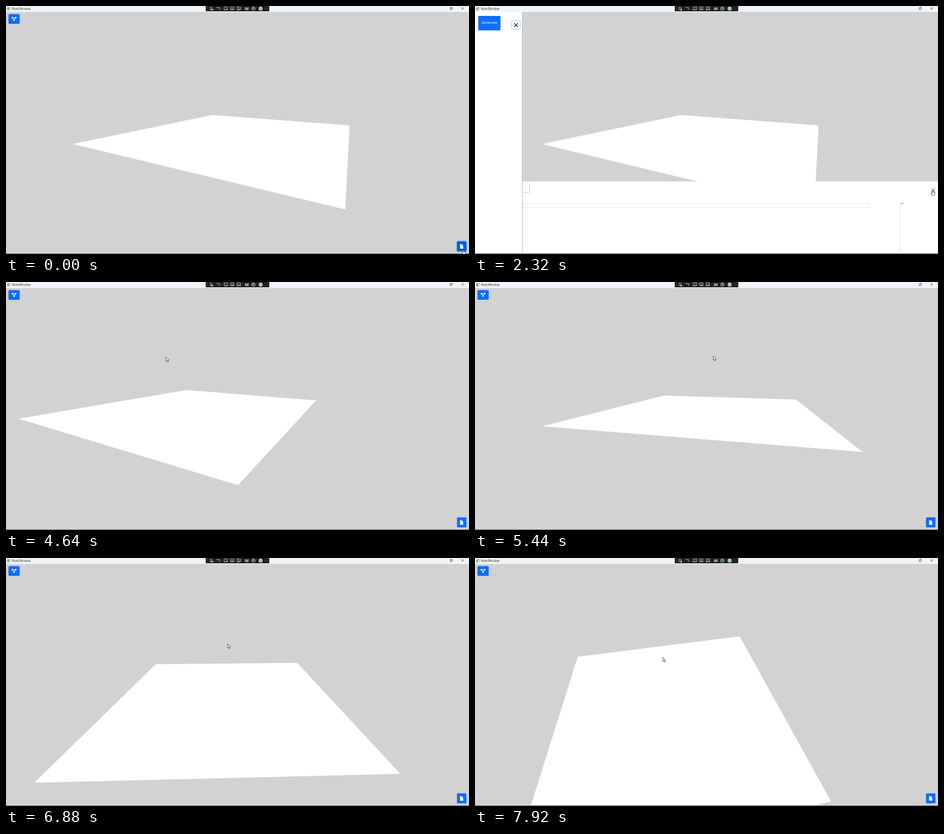
An HTML page with a canvas for the animation above (8 s loop, 700 by 376 pixels).

```html
<!DOCTYPE html>
<html lang="en">
<head>
<meta charset="utf-8">
<title>MainWindow</title>
<style>
  html, body { margin: 0; width: 100%; height: 100%; overflow: hidden; background: #d2d2d2; }
  canvas { display: block; width: 700px; height: 376px; }
</style>
</head>
<body>
<canvas id="stage"></canvas>
<script>
const W = 700, H = 376, BAR = 9, LOOP = 8000, STEP = 80;
const BLUE = '#0d6efd', HOVER = '#0b5ed7', RING = '#9ec1f5', INK = '#d5d5d5';
const RAD = Math.PI / 180;
const FOCAL = (H - BAR) / 2 / Math.tan(30 * RAD);
const canvas = document.getElementById('stage');
const g = canvas.getContext('2d');
const ratio = window.devicePixelRatio || 1;
canvas.width = W * ratio;
canvas.height = H * ratio;

// time; camera yaw and pitch in degrees; centre of the unit square in camera space
const views = [
  [3760, 27.9, 12.65, 0, 0, 1.065],
  [4160, 27.9, 12.65, 0.115, 0.035, 1.065],
  [4640, 27.9, 12.65, -0.207, -0.006, 1.05],
  [6080, 3.1, 8.18, 0.197, 0.001, 1.157],
  [7280, -4.1, 32.1, -0.186, 0.077, 0.969],
  [7920, -12, 47.35, -0.167, 0.116, 0.98]
];

// time, then the tip of the pointer
const pointer = [
  [320, 691.5, 370], [960, 383, 304], [1520, 9, 23.5], [1920, 9, 23.5],
  [2320, 692, 279], [2800, 692, 279], [3200, 63, 29], [3280, 63, 29],
  [3440, 243.5, 70], [3760, 304, 117], [4640, 242, 114],
  [6080, 455, 111], [7280, 275.5, 140], [7920, 284, 150.5]
];

function track(keys, t) {
  const next = keys.findIndex(key => key[0] >= t);
  if (next <= 0) return keys.at(next).slice(1);
  const a = keys[next - 1], b = keys[next];
  const k = (t - a[0]) / (b[0] - a[0]);
  return a.slice(1).map((v, i) => v + (b[i + 1] - v) * k);
}

function ease(t, start, length) {
  const k = Math.min(1, Math.max(0, (t - start) / length));
  return k * k * (3 - 2 * k);
}

function rect(x, y, w, h, color) {
  g.fillStyle = color;
  g.fillRect(x, y, w, h);
}

function round(x, y, w, h, r, color) {
  g.fillStyle = color;
  g.beginPath();
  g.roundRect(x, y, w, h, r);
  g.fill();
}

function path(points, close) {
  g.beginPath();
  for (let i = 0; i < points.length; i += 2) g.lineTo(points[i], points[i + 1]);
  if (close) g.closePath();
}

function line(points, color, width, close) {
  path(points, close);
  g.strokeStyle = color;
  g.lineWidth = width;
  g.stroke();
}

function shape(points, color) {
  path(points, true);
  g.fillStyle = color;
  g.fill();
}

function dot(x, y, r, color) {
  g.fillStyle = color;
  g.beginPath();
  g.arc(x, y, r, 0, Math.PI * 2);
  g.fill();
}

function box(x, y, w, h, color, width) {
  g.strokeStyle = color;
  g.lineWidth = width;
  g.strokeRect(x, y, w, h);
}

function cross(x, y, r, color, width) {
  line([x - r, y - r, x + r, y + r], color, width);
  line([x + r, y - r, x - r, y + r], color, width);
}

function label(text, x, y, size, color, align = 'left') {
  g.font = size + 'px "Open Sans", sans-serif';
  g.textAlign = align;
  g.textBaseline = 'middle';
  g.fillStyle = color;
  g.fillText(text, x, y);
}

function button(x, y, w, h, hover, focus) {
  if (focus) round(x - 1.5, y - 1.5, w + 3, h + 3, 2.5, RING);
  round(x, y, w, h, 1.5, hover ? HOVER : BLUE);
}

function ground(t) {
  const [yaw, pitch, x, y, z] = track(views, t);
  const s = Math.sin(yaw * RAD) / 2, c = Math.cos(yaw * RAD) / 2;
  const corners = [[-1, -1], [1, -1], [1, 1], [-1, 1]];
  shape(corners.flatMap(([a, b]) => {
    const side = a * s + b * c, away = a * c - b * s;
    const zoom = FOCAL / (z + away * Math.cos(pitch * RAD));
    return [
      W / 2 + (x + side) * zoom,
      (H + BAR) / 2 + (y - away * Math.sin(pitch * RAD)) * zoom
    ];
  }), '#fff');
}

function titleBar() {
  rect(0, 0, W, BAR, '#eff4f9');
  rect(2, 2, 4.5, 4.5, '#8a9a9f');
  rect(2.6, 3.2, 1.6, 2.7, '#4d9a80');
  rect(4.5, 3.2, 1.5, 2.7, '#f4f8fa');
  label('MainWindow', 9, 4.6, 4.6, '#333');
  box(671.5, 2.8, 2.6, 2.6, '#444', 0.6);
  line([672.5, 2, 675, 2, 675, 4.5], '#444', 0.5);
  cross(690.3, 3.8, 1.7, '#333', 0.6);
  debugBar();
}

function debugBar() {
  rect(302, 0, 96, 8, '#202020');
  for (let y = 2; y < 7; y += 2) rect(304, y, 0.8, 0.8, '#777');
  box(308.5, 2, 3, 3.5, INK, 0.6);
  dot(311.7, 5.5, 1.3, INK);
  line([318, 2.5, 323, 2.5, 323, 5.8], INK, 0.7);
  for (let i = 0; i < 3; i++) {
    box(330 + i * 9.7, 1.7, 5, 4, INK, 0.7);
    rect(361.5 + i * 1.9, 2 + i % 2 * 0.5, 1.2, 4, INK);
  }
  line([331.5, 6.5, 333.5, 4.2], INK, 0.8);
  rect(341, 4, 2, 1, INK);
  line([350.5, 6.5, 353.5, 3.5], INK, 1);
  dot(374, 4, 2.8, INK);
  dot(374, 4, 2.1, '#202020');
  dot(374, 3.6, 1, INK);
  dot(385, 4, 3, '#b9dfb9');
  line([383.5, 4, 384.6, 5.2, 386.6, 2.8], '#237a32', 0.8);
  line([393, 3.5, 394, 4.5, 395, 3.5], '#555', 0.5);
}

function nodesButton(hover, focus) {
  button(3.7, 12.3, 17, 14.8, hover, focus);
  const nodes = [9.7, 17.8, 14.5, 17.8, 12.2, 21.3];
  line(nodes, '#fff', 0.8, true);
  for (let i = 0; i < 6; i += 2) rect(nodes[i] - 1.1, nodes[i + 1] - 1.1, 2.2, 2.2, '#fff');
}

function fileButton(hover, focus) {
  button(681.8, 356.8, 14.4, 15.3, hover, focus);
  shape([686.6, 361, 689.4, 361, 691.2, 363, 691.2, 368, 686.6, 368], '#fff');
  line([689.4, 361, 689.4, 363, 691.2, 363], BLUE, 0.5);
}

function scriptPanel(open) {
  if (!open) return;
  g.save();
  g.translate(0, 110 * (1 - open));
  rect(0, 266, W, 110, '#fff');
  box(2.5, 269, 80, 13.5, '#eee', 0.6);
  line([3, 282.6, 82.5, 282.6, 82.5, 269.5], '#c9c9c9', 0.8);
  label('Script Name', 4.5, 275.6, 5.6, '#333');
  cross(693, 279.3, 3, '#333', 0.7);
  button(6, 299, 19.5, 14.5);
  label('RUN', 15.7, 306.5, 4.8, '#fff', 'center');
  label('1', 40.5, 302.5, 4.8, '#999');
  box(53.5, 299.3, 543.5, 6, '#e4e4e4', 0.8);
  rect(642, 299, 0.8, 73, '#e6e6e6');
  rect(643, 299, 5, 0.9, '#888');
  g.restore();
}

function sidePanel(open, focus) {
  if (!open) return;
  g.save();
  g.translate(72 * (open - 1), 0);
  rect(0, BAR, 71.5, H - BAR, '#fff');
  rect(71, BAR, 0.7, H - BAR, '#b0b0b0');
  button(5, 15, 33.5, 22);
  label('Generate', 21.7, 26, 5.7, '#fff', 'center');
  if (focus) {
    round(55, 22, 14, 14, 2, '#b6d4fe');
    round(56, 23, 12, 12, 1.2, '#fff');
  }
  cross(62, 29, 2.9, '#222', 1.1);
  g.restore();
}

function drawPointer(x, y, hand) {
  g.save();
  g.translate(x, y);
  g.lineJoin = 'round';
  const outline = hand
    ? [-0.7, 0, 0.5, 0, 0.6, 3, 3.3, 3.6, 3.3, 6, 2.5, 8, -0.8, 8, -2.6, 5, -1.8, 4.3, -0.7, 5.2]
    : [0, 0, 0, 6.2, 1.4, 5, 2.4, 7.3, 3.5, 6.8, 2.5, 4.6, 4.3, 4.5];
  shape(outline, '#fff');
  line(outline, '#222', 0.6, true);
  g.restore();
}

function draw(t) {
  g.setTransform(ratio, 0, 0, ratio, 0, 0);
  rect(0, 0, W, H, '#d2d2d2');
  ground(t);

  const [x, y] = track(pointer, t);
  const onNodes = x < 21 && y < 28;
  const onFile = x > 682 && y > 357;
  const onClose = x > 690 && y < 282 || x < 66 && t > 3000;

  nodesButton(onNodes, t >= 3600 && t < 3760);
  fileButton(onFile, t < 400);
  scriptPanel(ease(t, 80, 320) - ease(t, 2400, 300));
  sidePanel(ease(t, 1900, 320) - ease(t, 3368, 250), t >= 2000);
  rect(0, 375, W, 1, '#747984');
  titleBar();
  drawPointer(x, y, onNodes || onFile || onClose);
}

const began = performance.now();

function tick() {
  const t = (performance.now() - began) % LOOP;
  draw(Math.floor(t / STEP) * STEP);
  requestAnimationFrame(tick);
}

tick();
</script>
</body>
</html>
```
